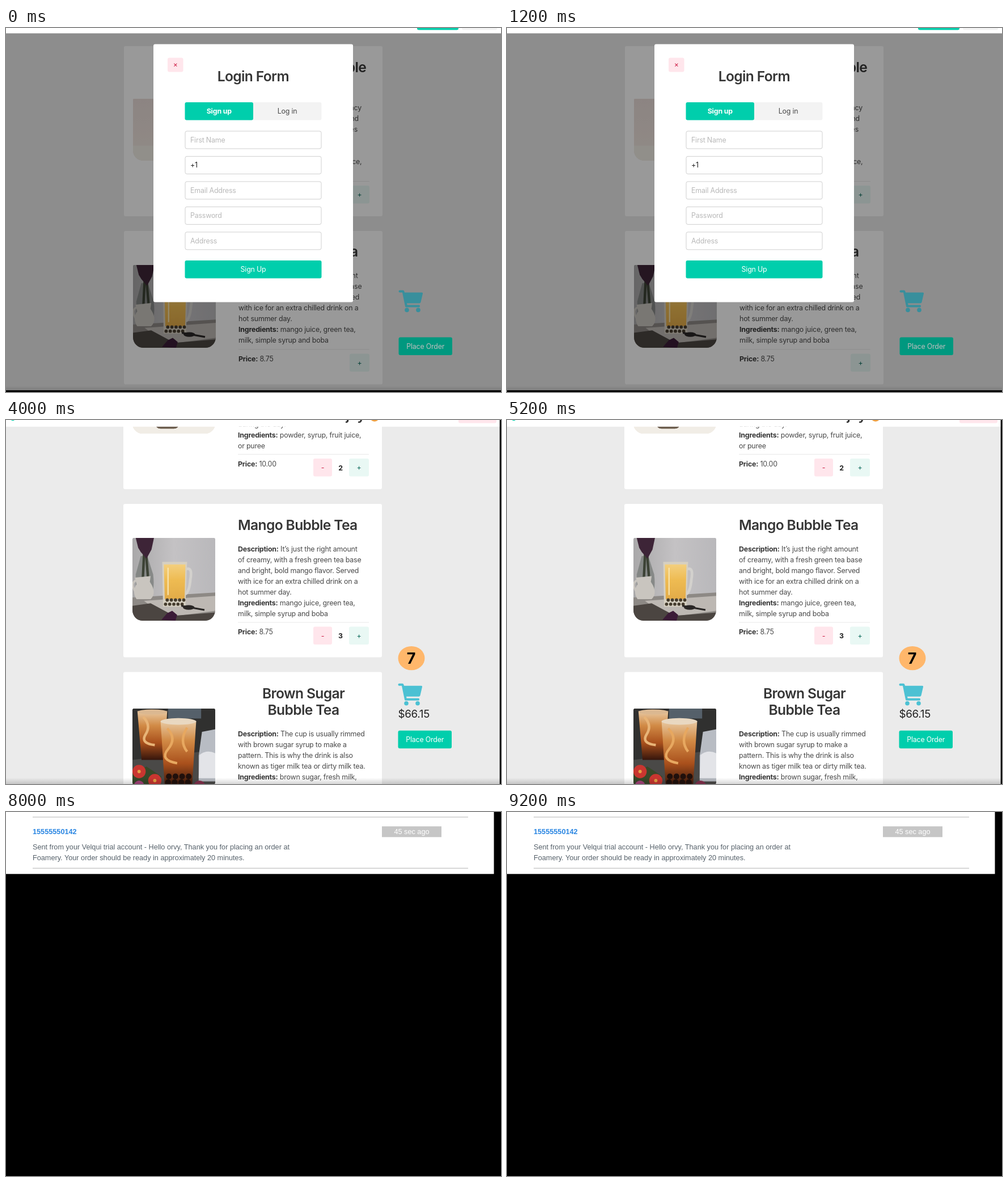
Animation, 873 px wide and 642 px high, one loop 10 s. Source, as an HTML page:

```html
<!DOCTYPE html>
<html lang="en">
<head>
<meta charset="utf-8">
<title>Tea order</title>
<style>
  html, body { margin: 0; width: 100%; height: 100%; overflow: hidden; background: #000; }
  svg { display: block; }
  #stage { width: 873px; height: 642px; }
  text { font: 400 12.4px Inter, Roboto, sans-serif; letter-spacing: -.016em; fill: #4a4a4a; white-space: pre; }
  .strong { font-weight: 700; fill: #363636; }
  .title { font-size: 24.6px; font-weight: 600; letter-spacing: -.026em; fill: #363636; }
  .big { font-size: 18.8px; }
  .white { fill: #fff; }
  .hint { fill: #b9b9b9; }
  .ink { fill: #222; }
  .red { fill: #cc1840; }
  .green { fill: #0b6b5b; }
  .sms text { font-family: "Liberation Sans", Arial, sans-serif; font-size: 12.7px; letter-spacing: 0; fill: #56616a; }
  .sms .from { font-weight: 700; fill: #2a86e2; }
  .sms .white { fill: #fff; }
  .row { filter: drop-shadow(0 5px 6px rgba(0,0,0,.12)); }
  .dim { filter: brightness(.74); }
</style>
</head>
<body>
<svg id="stage" viewBox="0 0 873 642" xmlns="http://www.w3.org/2000/svg">
  <defs>
    <linearGradient id="foot" x2="0" y2="1">
      <stop stop-color="#000" stop-opacity="0"/><stop offset="1" stop-color="#000" stop-opacity=".16"/>
    </linearGradient>
    <linearGradient id="wall" x2="1" y2="0">
      <stop stop-color="#a9a8a9"/><stop offset=".5" stop-color="#c4c2c4"/><stop offset="1" stop-color="#b9b8bb"/>
    </linearGradient>
    <linearGradient id="mango" x2="0" y2="1">
      <stop stop-color="#f3cf7e"/><stop offset=".45" stop-color="#eebb52"/><stop offset="1" stop-color="#e2ab48"/>
    </linearGradient>
    <linearGradient id="amber" x2="0" y2="1">
      <stop stop-color="#e8c9a2"/><stop offset=".3" stop-color="#d18a45"/>
      <stop offset=".65" stop-color="#a9501c"/><stop offset="1" stop-color="#35150c"/>
    </linearGradient>
    <linearGradient id="cream" x2="0" y2="1">
      <stop stop-color="#e9dcd8"/><stop offset="1" stop-color="#f0e6df"/>
    </linearGradient>
    <clipPath id="round75"><path d="M1 0H99L100 1V63A12 12 0 0 1 88 75H12A12 12 0 0 1 0 63V1Z"/></clipPath>
    <clipPath id="round100"><path d="M1 0H99L100 1V87A12 13 0 0 1 88 100H12A12 13 0 0 1 0 87V1Z"/></clipPath>

    <g id="classic">
      <path fill="url(#cream)" d="M0 0H100V75H0Z"/>
      <path fill="#f1ede6" d="M0 57H100V75H0Z"/>
      <path stroke="#57477e" stroke-width="4.5" d="M61 4L48 31"/>
      <rect x="30" y="24" width="24" height="8" rx="2" fill="#d3c8ba"/>
      <rect x="28" y="30" width="28" height="39" rx="6" fill="#a49581"/>
      <path fill="#6b5c4d" d="M28 53H56V63Q56 69 50 69H34Q28 69 28 63Z"/>
      <path stroke="#c9bdad" stroke-width="3" d="M32 36V52"/>
    </g>

    <g id="mangoTea">
      <path fill="url(#wall)" d="M0 0H100V100H0Z"/>
      <path fill="#8d8985" d="M0 72L100 66V100H0Z"/>
      <path fill="#bdb8b3" d="M14 76L100 70V88L40 96Z"/>
      <path fill="#4b4541" d="M0 82L22 79L50 94L100 90V100H0Z"/>
      <path fill="#777b78" d="M10 22H18L25 44Q27 60 23 70H4V44Z" opacity=".75"/>
      <path stroke="#3c4235" stroke-width="3" fill="none" d="M12 60L14 20M19 50L16 14"/>
      <path fill="#3d2437" d="M4 0H26L23 14L17 25L10 17L7 12Z"/>
      <path fill="#c9c5bf" d="M3 48L22 46L21 53Q30 66 22 74H5Q-1 65 5 56Z"/>
      <path stroke="#c9c5bf" stroke-width="2.5" fill="none" d="M5 51Q-3 54 3 64"/>
      <path stroke="#d3d1cd" stroke-width="3.2" fill="none" d="M64 38Q73 34 70 50Q69 64 64 68"/>
      <path fill="#d6d0c2" d="M36 29H66L64 83H37Z"/>
      <path fill="url(#mango)" d="M38 32H64L63 74H39Z"/>
      <path stroke="#f8e4b0" stroke-width="1.5" d="M43 36V69"/>
      <path stroke="#453c2e" stroke-width="4" stroke-dasharray="0 5" stroke-linecap="round" d="M42 75H63M40 80H62"/>
      <path stroke="#2a2726" stroke-width="2.2" d="M59 82L87 87"/>
      <ellipse cx="68" cy="84" rx="7" ry="2.8" fill="#2a2726"/>
      <path fill="#3b1b37" d="M35 99L42 91L48 88L54 93L52 100Z"/>
    </g>

    <g id="sugarTea">
      <path fill="#30302f" d="M0 0H100V100H0Z"/>
      <path fill="#4a4947" d="M0 62L100 50V100H0Z"/>
      <path fill="#55606a" d="M43 0H83V12H43Z"/>
      <path fill="#b8bcc3" d="M84 28L100 25V88H80V57Z"/>
      <path fill="#e3e4e8" d="M81 56Q90 49 100 54V84H80Z"/>
      <path fill="url(#amber)" d="M6 3H42L38 62H11Z"/>
      <ellipse cx="24" cy="4" rx="18" ry="3" fill="#dbb891"/>
      <path stroke="#e8b477" stroke-width="3" fill="none" d="M13 10Q23 20 16 31T27 44"/>
      <path fill="url(#amber)" d="M34 15H77L72 94H39Z"/>
      <ellipse cx="55.5" cy="15.5" rx="21.5" ry="4" fill="#e9d8c1"/>
      <path stroke="#e7a860" stroke-width="3" fill="none" d="M42 24Q54 36 43 49T54 66M66 23Q56 39 66 52"/>
      <path stroke="#20100c" stroke-width="7" stroke-dasharray="0 8" stroke-linecap="round" d="M44 82H70M43 89H70"/>
      <path fill="#384829" d="M0 77L17 70L35 82L32 100H0Z"/>
      <g fill="#c93630">
        <circle cx="8" cy="76" r="8"/><circle cx="27" cy="87" r="8"/><circle cx="8" cy="93" r="6" fill="#a7437c"/>
        <circle cx="81" cy="94" r="7" fill="#85304d"/>
      </g>
      <g fill="#e5a044"><circle cx="8" cy="76" r="2"/><circle cx="27" cy="87" r="2"/></g>
    </g>
  </defs>
</svg>
<script>
const LOOP = 10000, HOLD = 2000;
const TEAL = '#00ceac', PINK = '#ffe6ec', MINT = '#e9f8f4';

const rect = (x, y, w, h, fill, r = 0, extra = '') =>
  `<rect x="${x}" y="${y}" width="${w}" height="${h}" rx="${r}" fill="${fill}" ${extra}/>`;
const text = (x, y, str, cls = '', anchor = 'start') =>
  `<text x="${x}" y="${y}" class="${cls}" text-anchor="${anchor}">${str}</text>`;
const mid = (x, y, str, cls) => text(x, y, str, cls, 'middle');
const bold = str => `<tspan class="strong">${str}</tspan>`;
const lines = (x, y, list) => list.map((str, i) => text(x, y + i * 19, str)).join('');
const shift = (x, y, body) => `<g transform="translate(${x} ${y})">${body}</g>`;
const button = (x, y, w, h, fill, label, cls) =>
  rect(x, y, w, h, fill, 3) + mid(x + w / 2, y + h / 2 + 4.5, label, cls);
const photo = (id, x, y, w, ratio, rounded) =>
  `<svg x="${x}" y="${y}" width="${w}" height="${w * ratio}" viewBox="0 0 100 ${ratio * 100}">
    <use href="#${id}" ${rounded ? `clip-path="url(#round${ratio * 100})"` : ''}/></svg>`;

function priceRow(y, price, count) {
  const minus = count
    ? button(542, y + 7.5, 33, 31.5, PINK, '-', 'red') + mid(590, y + 28, count, 'strong ink') : '';
  return rect(409, y - .5, 231, 1, '#e9e9e9') + text(409, y + 21, bold('Price:') + ' ' + price) +
    minus + button(605, y + 7.5, 35, 31.5, MINT, '+', 'green');
}

const cardBox = (y, h) => rect(207, y, 456, h, '#fff', 3);

const menu = (classicCount, mangoCount) =>
  cardBox(33.5, 300) + photo('classic', 223, 126, 146, .75, true) +
  mid(524.5, 80, 'Classic Milk Bubble', 'title') + mid(524.5, 109, 'Tea', 'title') +
  text(626, 147, 'fancy', '', 'end') + text(621, 166, 'and', '', 'end') + text(619, 185, 'notes', '', 'end') +
  lines(409, 223, ['during the day.', bold('Ingredients:') + ' powder, syrup, fruit juice,', 'or puree']) +
  priceRow(272, '10.00', classicCount) +

  cardBox(359.5, 270.5) + photo('mangoTea', 223, 419.5, 146, 1, true) +
  text(409, 405, 'Mango Bubble Tea', 'title') +
  lines(409, 443, [
    bold('Description:') + ' It’s just the right amount', 'of creamy, with a fresh green tea base',
    'and bright, bold mango flavor. Served', 'with ice for an extra chilled drink on a', 'hot summer day.',
    bold('Ingredients:') + ' mango juice, green tea,', 'milk, simple syrup and boba']) +
  priceRow(568.5, '8.75', mangoCount) +

  cardBox(656, 300) + photo('sugarTea', 223, 720.5, 146, 1, true) +
  mid(524.5, 702, 'Brown Sugar', 'title') + mid(524.5, 731, 'Bubble Tea', 'title') +
  lines(409, 769, [
    bold('Description:') + ' The cup is usually rimmed', 'with brown sugar syrup to make a',
    'pattern. This is why the drink is also', 'known as tiger milk tea or dirty milk tea.',
    bold('Ingredients:') + ' brown sugar, fresh milk,']);

const cart = `<g fill="#4cc1d3">
  <path d="M693.5 464H699Q701 464 701.4 466L702 468H732.5Q734.5 468 734 470L730.5 485Q730 487 728 487H706L706.6 490H727.5
    Q729 490 729 492T727.5 494H705Q703.3 494 703 492.5L698 468H693.5Q691.5 468 691.5 466T693.5 464Z"/>
  <circle cx="706" cy="499" r="3.8"/><circle cx="726" cy="499" r="3.8"/></g>`;

const sidebar = (dim, total) => `<g class="${dim ? 'dim' : ''}">` + cart +
  button(691.5, 547, 94.5, 31.5, TEAL, 'Place Order', 'white') +
  (total ? '<ellipse cx="715" cy="419.3" rx="23.5" ry="21.2" fill="#ffb76b"/>' +
    '<text x="714.5" y="429" text-anchor="middle" style="font-size:27px;font-weight:700;fill:#000">7</text>' +
    text(691.5, 524, total, 'big ink') : '') + '</g>';

const nav = signedIn => rect(-5, -10, 890, 21, '#fff') + (signedIn
  ? rect(798, -20, 67, 24.8, PINK, 3) + `<circle cx="12" cy="-3" r="3.5" fill="${TEAL}"/>` +
    text(633, -.5, 'Enjoy', 'title', 'end') + '<circle cx="650" cy="-6.5" r="8.5" fill="#f0a040"/>'
  : rect(724, -20, 73, 25, TEAL, 3) + rect(803, -20, 62, 25, '#f3f3f3', 3));

const shade = rect(-5, -5, 890, 660, 'rgba(0,0,0,.4)');
const backdrop = rect(0, 0, 873, 642, '#ebebeb');
const footShadow = rect(0, 631, 873, 11, 'url(#foot)');
const rightEdge = rect(870.7, 0, 3, 642, '#000');
const bottomEdge = y => rect(0, y, 873, 642 - y, '#000');

function loginForm(fields, submit) {
  const first = 183, step = 44.5, submitY = first + step * fields.length + 6;
  const input = (label, i) => {
    const y = first + i * step;
    return rect(315, y + .5, 240, 31, '#fff', 3, 'stroke="#cfcfcf"') +
      text(324, y + 20.5, label, label === '+1' ? 'ink' : 'hint');
  };
  return rect(259, 30, 352, submitY + 43.5, '#fff', 3) +
    button(284, 54, 27.5, 25, PINK, '×', 'red') +
    mid(434.8, 96, 'Login Form', 'title') +
    rect(425, 132.5, 130.5, 31.5, '#f3f3f3', 3) + mid(495, 153, 'Log in') +
    button(314.5, 132.5, 120.5, 31.5, TEAL, 'Sign up', 'strong white') +
    fields.map(input).join('') +
    button(314.5, submitY, 241, 31.5, TEAL, submit, 'white');
}

function orderRow(id, y, h, ratio, centers, values) {
  const base = y + h / 2 - 5.5;
  const heads = ['Name:', 'Price:', 'Quantity:', 'Sum:'];
  return rect(227, y, 416, h, '#fff', 3, 'class="row"') + photo(id, 230.5, y + 3.8, 79.3, ratio) +
    heads.map((head, i) => mid(centers[i], base, head, 'strong') + mid(centers[i], base + 19, values[i])).join('');
}

const summary = rect(171, 30.2, 528, 417.5, '#fff', 3) +
  button(417.5, 35.2, 35, 31, PINK, '×', 'red') +
  orderRow('classic', 91.7, 71, .75, [394.5, 496.5, 560.5, 622.5], ['Classic Milk Bubble Tea', '10.00', 2, '20.00']) +
  orderRow('mangoTea', 188.3, 91.3, 1, [387, 482.5, 553, 622.5], ['Mango Bubble Tea', '8.75', 3, '26.25']) +
  orderRow('sugarTea', 305.4, 91.3, 1, [396, 500, 562.5, 622.5], ['Brown Sugar Bubble Tea', '9.95', 2, '19.90']) +
  mid(435, 436.8, 'Total Price: 66.15', 'big');

const signedOut = modal => menu() + shade + sidebar(true) + modal + nav(false);
const ordering = modal => shift(0, -212.3, menu(2, 3)) + (modal ? shade : '') +
  sidebar(!!modal, '$66.15') + modal + nav(true);

const message = '<g class="sms">' + rect(0, 0, 873, 642, '#000') + rect(0, 0, 860.5, 109.3, '#fff') +
  rect(47, 8.2, 768, 1.5, '#ccc') + rect(47, 98.5, 768, 1.5, '#ccc') +
  text(47, 39, '15555550142', 'from') +
  lines(47, 66, [
    'Sent from your Velqui trial account - Hello orvy, Thank you for placing an order at',
    'Foamery. Your order should be ready in approximately 20 minutes.']) +
  rect(663, 25.3, 105, 19, '#c6c6c6') + mid(715.5, 39, '45 sec ago', 'white') + '</g>';

const signUp = loginForm(['First Name', '+1', 'Email Address', 'Password', 'Address'], 'Sign Up');
const logIn = loginForm(['Email Address', 'Password'], 'Log In');

const scenes = [
  backdrop + shift(1, -1.6, signedOut(signUp)) + footShadow + bottomEdge(639),
  backdrop + signedOut(logIn) + footShadow + rightEdge + bottomEdge(640.7),
  backdrop + shift(0, .8, ordering('')) + footShadow + rightEdge,
  backdrop + shift(0, .8, ordering(summary)) + footShadow + rightEdge + bottomEdge(641),
  message
];

const stage = document.getElementById('stage');
stage.insertAdjacentHTML('beforeend', scenes.map(body => `<g class="scene" display="none">${body}</g>`).join(''));
const groups = [...stage.querySelectorAll('.scene')];
const start = performance.now();

function update(time) {
  const current = Math.floor((time % LOOP) / HOLD);
  groups.forEach((group, i) => group.setAttribute('display', i === current ? 'inline' : 'none'));
}

function tick() {
  update(performance.now() - start);
  requestAnimationFrame(tick);
}
tick();
</script>
</body>
</html>
```
